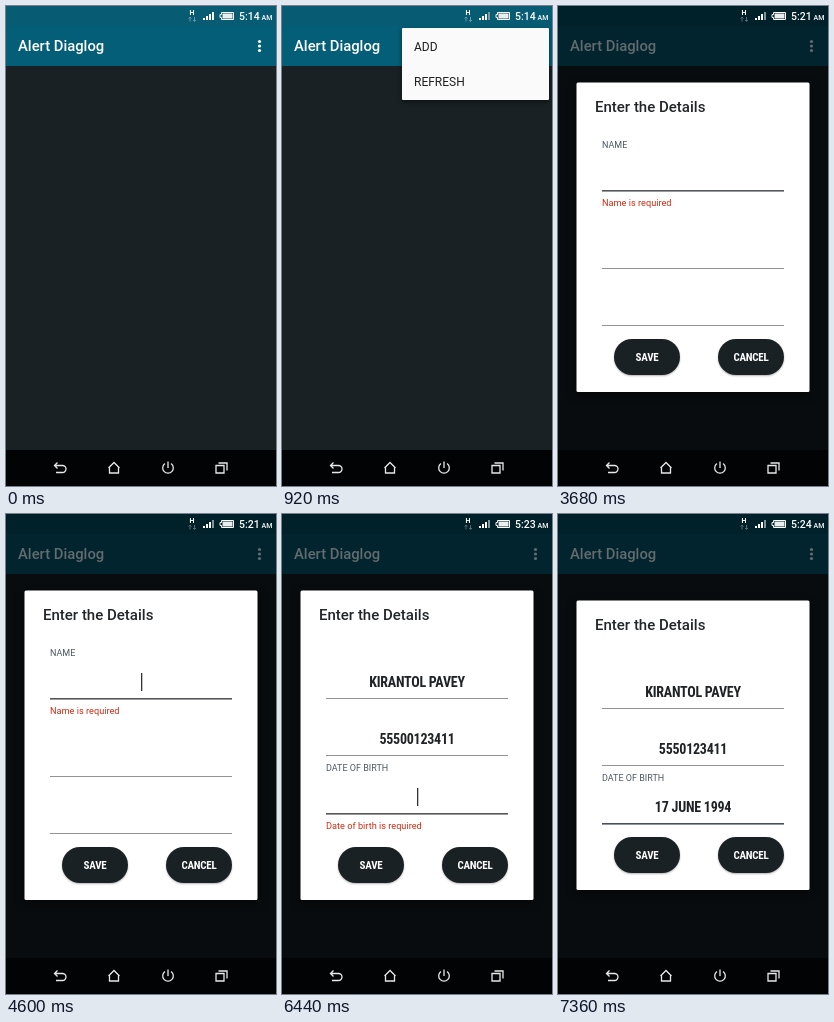
Animation of 270x480 px, one loop 8000 ms. Source, as an HTML page with a canvas:

```html
<!DOCTYPE html>
<html lang="en">
<head>
<meta charset="utf-8">
<title>Alert dialog</title>
<style>
html, body { margin: 0; width: 100%; height: 100%; overflow: hidden; background: #000; }
canvas { display: block; width: 270px; height: 480px; }
</style>
</head>
<body>
<canvas id="stage" width="270" height="480"></canvas>
<script>
const ctx = document.getElementById('stage').getContext('2d');
const LOOP = 8000, STEP = 920;
const PERSON = 'KIRANTOL PAVEY';
const LABELS = ['NAME', 'MOBILE NUMBER', 'DATE OF BIRTH'];
const ERRORS = ['Name is required', 'Mobile number is required', 'Date of birth is required'];

// One scene per step of the loop.
const scenes = [
  { clock: '5:14' },
  { clock: '5:14', menu: true, data: 'dim' },
  { clock: '5:21', data: 'on', form: { focus: 0, values: [] } },
  { clock: '5:21', form: { focus: 0, values: [], cursor: true } },
  { clock: '5:21', form: { focus: 0, values: [], error: true } },
  { clock: '5:21', form: { focus: 0, values: [], error: true, cursor: true } },
  { clock: '5:22', form: { focus: 1, values: [PERSON], error: true, cursor: true } },
  { clock: '5:23', form: { focus: 2, values: [PERSON, '55500123411'], error: true, cursor: true } },
  { clock: '5:24', form: { focus: 2, values: [PERSON, '5550123411', '17 JUNE 1994'] } }
];

function rect(x, y, w, h, color) {
  ctx.fillStyle = color;
  ctx.fillRect(x, y, w, h);
}

function round(x, y, w, h, r, color) {
  ctx.fillStyle = color;
  ctx.beginPath();
  ctx.roundRect(x, y, w, h, r);
  ctx.fill();
}

function text(str, x, y, size, color, { weight = 400, align = 'left', condensed = false } = {}) {
  ctx.fontStretch = condensed ? 'condensed' : 'normal';
  ctx.letterSpacing = condensed ? '-0.25px' : '0px';
  ctx.font = `${weight} ${size}px ${condensed ? '"Roboto Condensed", ' : ''}Roboto, sans-serif`;
  ctx.textAlign = align;
  ctx.fillStyle = color;
  ctx.fillText(str, x, y);
}

function path(d, color, width = 1.3) {
  ctx.strokeStyle = color;
  ctx.lineWidth = width;
  ctx.stroke(new Path2D(d));
}

function withShadow(blur, dy, alpha, draw) {
  ctx.save();
  ctx.shadowColor = `rgba(0,0,0,${alpha})`;
  ctx.shadowBlur = blur;
  ctx.shadowOffsetY = dy;
  draw();
  ctx.restore();
}

function statusBar({ clock, data, form }) {
  const arrows = data === 'on' ? '#fff' : form ? '#56676d' : '#6497a5';
  text('H', 186, 9, 7, '#fff', { weight: 700, align: 'center' });
  path('M184 15.5V11M182.5 12.5L184 11L185.5 12.5M188.5 11V15.5M187 14L188.5 15.5L190 14', arrows, 1);
  for (let i = 0; i < 4; i++) {
    const dim = i === 3 && (form || data);
    rect(197 + i * 3, 12 - i * 2, 2, 2 + i * 2, dim ? '#7d969d' : '#fff');
  }
  path('M215.5 6.5H227.5V13.5H215.5V11.5H214V8.5H215.5Z', '#fff', 1);
  rect(216.5, 7.5, 10, 5, '#e8eef0');
  text(clock, 233, 14, 10.5, '#fff', { weight: 500 });
  text('AM', 255.5, 14, 7, '#fff', { weight: 500 });
}

function appBar(dimmed) {
  rect(0, 0, 270, 60, dimmed ? '#02242e' : '#055e77');
  rect(0, 0, 270, 20, dimmed ? '#01212a' : '#075b72');
  const color = dimmed ? '#626b6e' : '#fff';
  text('Alert Diaglog', 12, 45, 14.8, color, { weight: 500 });
  ctx.fillStyle = color;
  for (const y of [35.5, 40, 44.5]) {
    ctx.beginPath();
    ctx.arc(253.5, y, 1.6, 0, 7);
    ctx.fill();
  }
}

function navBar() {
  rect(0, 444, 270, 36, '#020305');
  const c = '#e8e8e8';
  path('M51.5 456.5L48.5 459.5L51.5 462.5M49 459.5H56.5A3.5 3.5 0 0 1 56.5 466.5H50', c);
  path('M102.5 462L108 456.5L113.5 462M103.5 461V467H112.5V461', c);
  path('M159 457.5A5.3 5.3 0 1 0 165 457.5M162 455.5V462', c);
  path('M210 459.5H218V467H210ZM212.5 457H221V464.5', c);
}

function menu() {
  withShadow(5, 2, 0.5, () => round(120, 22, 147, 72, 1, '#fafafa'));
  text('ADD', 132, 45, 12, '#222');
  text('REFRESH', 132, 80, 12, '#222');
}

function button(label, x, y) {
  withShadow(2, 1, 0.3, () => round(x, y, 66, 36, 18, '#1a2124'));
  text(label, x + 33, y + 22, 11, '#fff', { weight: 700, align: 'center', condensed: true });
}

function dialog({ focus, values, error, cursor }) {
  const top = error ? 76.5 : 86.5;
  withShadow(8, 3, 0.6, () => round(18.5, top, 233, error ? 309.5 : 289.5, 1.5, '#fff'));
  text('Enter the Details', 37, Math.floor(top + 30), 15, '#222629', { weight: 500 });
  for (let i = 0; i < 3; i++) {
    const y = Math.floor(top + 107.5 + i * 57.5 + (error && i > focus ? 20.5 : 0));
    const active = i === focus;
    rect(44, y, 182, active ? 1.6 : 1, active ? (error ? '#53565a' : '#45515e') : '#929292');
    if (values[i]) {
      text(values[i], 135, y - 11, 14, '#202326', { weight: 700, align: 'center', condensed: true });
    }
    if (!active) continue;
    text(LABELS[i], 44, y - 42, 9, '#4d5862');
    if (cursor) rect(135, y - 25, 1.3, 18, '#333');
    if (error) text(ERRORS[i], 44, y + 16, 9.2, '#d62b12');
  }
  const buttonY = top + (error ? 256.5 : 236.5);
  button('SAVE', 56, buttonY);
  button('CANCEL', 160, buttonY);
}

function draw(scene) {
  rect(0, 0, 270, 480, scene.form ? '#090c0e' : '#1a2124');
  appBar(Boolean(scene.form));
  statusBar(scene);
  navBar();
  if (scene.menu) menu();
  if (scene.form) dialog(scene.form);
}

function frame(now) {
  draw(scenes[Math.floor((now % LOOP) / STEP)]);
  requestAnimationFrame(frame);
}
frame(performance.now());
</script>
</body>
</html>
```
